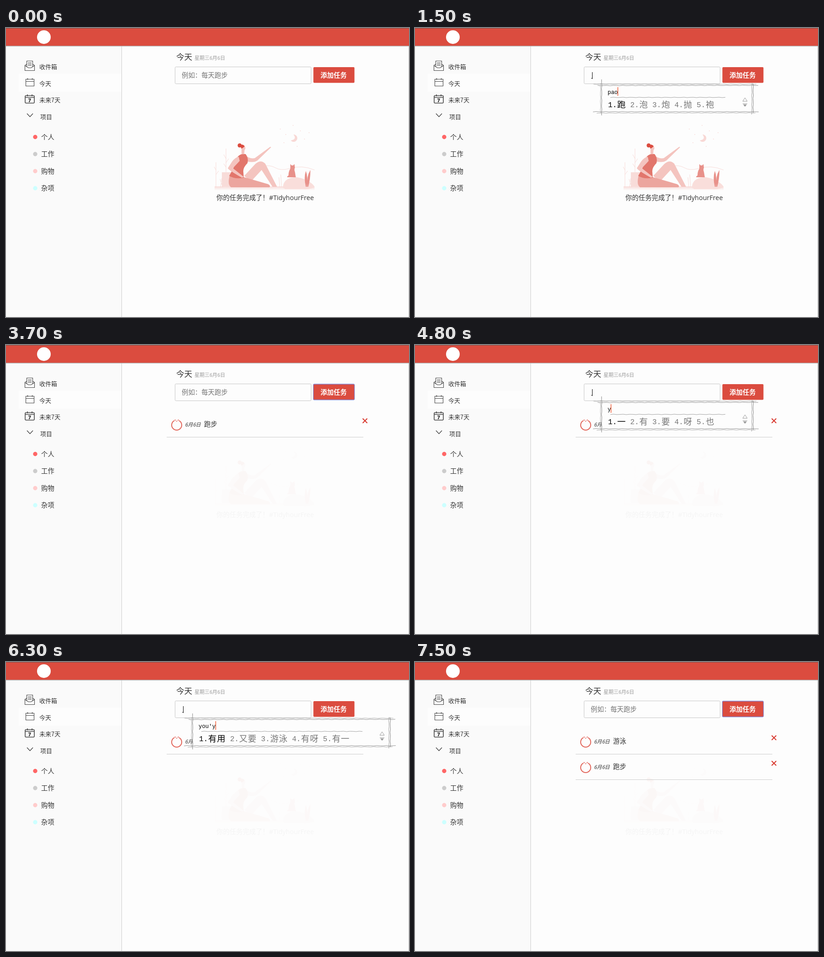
Write an HTML page that moves like this. It is 883 px wide and 635 px high and loops after 8000 ms.

```html
<!DOCTYPE html>
<html lang="zh-CN">
<head>
<meta charset="utf-8">
<style>
  html, body { margin: 0; width: 100%; height: 100%; overflow: hidden; background: #fdfdfd; }
  svg { display: block; width: 883px; height: 635px; }
  text { font: 14.4px "Open Sans", "Noto Sans CJK SC", "Noto Sans CJK", sans-serif; fill: #333; white-space: pre; }
  .cjk { font-family: "Noto Sans CJK SC", "Noto Sans CJK", sans-serif; }
  .centred { font-family: "Noto Sans CJK TC", "Noto Sans CJK", sans-serif; }
  .menu { font-size: 13px; }
  .title { font-size: 17.6px; font-weight: 300; }
  .date { font-size: 11px; fill: #999; }
  .due { font-size: 11.2px; font-style: italic; }
  .hint { fill: #757575; }
  .button { font-weight: 700; fill: #fff; }
  .pinyin { font: 12.4px "Liberation Mono", monospace; fill: #000; }
  .number { font: 16.1px "Liberation Mono", monospace; }
  .word { font-size: 18.5px; font-weight: 300; letter-spacing: .8px; }
  .line { fill: none; stroke: #444; stroke-width: 1.1; }
</style>
</head>
<body>
<svg viewBox="0 0 883 635">
  <defs>
    <linearGradient id="shade" x2="0" y2="1">
      <stop stop-color="#8f8585"/><stop offset="1" stop-color="#fdfdfd" stop-opacity="0"/>
    </linearGradient>
    <linearGradient id="ground" x2="0" y2="1">
      <stop stop-color="#f6cfcb"/><stop offset="1" stop-color="#fdfdfd"/>
    </linearGradient>
  </defs>

  <!-- page -->
  <rect width="253" height="635" fill="#fafafa"/>
  <rect x="28" y="100" width="225" height="40" fill="#fdfdfd"/>
  <path d="M253.5 39V635M882.5 39V635" stroke="#ccc"/>
  <rect y="39" width="883" height="3" fill="url(#shade)"/>
  <rect width="883" height="39" fill="#db4c3f"/>
  <rect width="883" height="1" fill="#7a5550"/>
  <circle cx="83" cy="20" r="15" fill="#fff"/>

  <!-- sidebar -->
  <g class="line">
    <path d="M45.500 79.500L41.500 82V93.500H62.500V82L58.500 79.500M41.500 82.500L49 87.500H55L62.500 82.500M45.500 85V72.500H58.500V85M48 76.500H56M48 79.500H56M48 82.500H56"/>
    <path d="M43.500 112.500H61.500V127.500H43.500ZM43.500 117.500H61.500M47.500 110V114M57.500 110V114"/>
    <path stroke-width="1.6" d="M44 148.500H60Q62 148.500 62 150.500V163Q62 165 60 165H44Q42 165 42 163V150.500Q42 148.500 44 148.500ZM42 152.500H62M47 146V150M57 146V150"/>
    <path stroke-width="1.4" d="M46 188L52.500 195L59 188"/>
  </g>
  <text x="48.500" y="162.500" style="font-size:11px;font-weight:800">7</text>
  <g id="menu"></g>

  <!-- main column -->
  <text class="cjk title" x="373" y="70">今天</text>
  <text class="cjk date" x="413" y="70">星期三6月6日</text>
  <rect x="370.500" y="85.500" width="298" height="37" rx="2" fill="#fdfdfd" stroke="#c6c6c6"/>
  <rect x="673.500" y="86" width="90" height="34.500" rx="2" fill="#db4c3f"/>
  <text class="cjk button" x="689" y="109">添加任务</text>

  <g id="empty">
    <g fill="none" stroke="#f8dcd9">
      <path d="M460 350V295M460 312L456 305M460 322L466 314M470 350L473 330M475 350L469 332M482 318V265M482 287L477 278M482 296L488 287M482 306L477 298"/>
      <path d="M562 304Q578 300 590 307T620 309Q648 300 676 312M600 350L598 328M604 350L602 322"/>
    </g>
    <rect x="473" y="317" width="25" height="31" fill="#f8dcd9"/>
    <rect x="457" y="348" width="219" height="9" fill="url(#ground)" opacity=".7"/>
    <path d="M607 351C607 334 620 328 637 328C655 330 674 342 676 349Q670 355 650 354H612Z" fill="#f9dedb"/>
    <path d="M623 299L626 302H629L632 299L633 307Q631 311 633 316L635 328H617Q614 327 619 324Q619 315 623 309Z" fill="#e8918a"/>
    <path d="M657 349Q652 329 657 314Q662 327 659 349ZM660 349Q658 326 667 312Q667 333 662 349Z" fill="#e8918a"/>
    <path d="M630 234A8 8 0 1 1 624 247Q638 245 630 234Z" fill="#f8d8d5"/>
    <g id="stars" fill="#f8d8d5"></g>
    <path d="M522 325L546 299Q558 288 568 298L594 349H584L560 312L537 337Z" fill="#f4c4bf"/>
    <path d="M491 321Q484 344 493 350H577Q581 347 574 343L519 327Z" fill="#eca59e"/>
    <path d="M525 280Q534 288 545 286L579 261L581 262L551 291Q543 297 527 293Z" fill="#f4c4bf"/>
    <path d="M507 284Q513 275 525 277Q532 286 529 297Q519 307 520 316L521 329Q503 333 489 325Q501 305 507 284Z" fill="#e2766c"/>
    <path d="M510 283Q502 284 495 294L486 308Q487 312 517 329L521 327L497 308L512 292Z" fill="#f4c4bf"/>
    <path d="M516 264H523L522 276Q519 279 516 276Z" fill="#f4c4bf"/>
    <ellipse cx="520" cy="264" rx="4.500" ry="5" fill="#f4c4bf"/>
    <circle cx="512" cy="258" r="4.500" fill="#db4c3f"/>
    <path d="M513 259Q518 253 523 260Q520 263 516 265Z" fill="#db4c3f"/>
    <text x="461" y="378">你的任务完成了<tspan class="centred">！</tspan>#TidyhourFree</text>
  </g>
  <g id="state"></g>
</svg>

<script>
const $ = id => document.getElementById(id);
const LOOP = 8000;
const text = (x, y, cls, s, extra = '') => `<text x="${x}" y="${y}" class="${cls}" ${extra}>${s}</text>`;
const path = (d, stroke, width = 1) => `<path d="${d}" fill="none" stroke="${stroke}" stroke-width="${width}"/>`;

$('menu').innerHTML =
  [['收件箱', 73, 90], ['今天', 73, 126.5], ['未来7天', 73, 162.5], ['项目', 75, 199.5]]
    .map(([s, x, y]) => text(x, y, 'cjk menu', s)).join('') +
  [['个人', '#f66'], ['工作', '#ccc'], ['购物', '#fcc'], ['杂项', '#cff']]
    .map(([s, color], i) => `<circle cx="64" cy="${239.5 + i * 37.5}" r="4.700" fill="${color}"/>` +
      text(77, 244.5 + i * 37.5, 'cjk', s)).join('');

$('stars').innerHTML = [[601, 222], [629, 214], [645, 226], [664, 230], [613, 234], [654, 244], [609, 252], [638, 260]]
  .map(([x, y]) => `<circle cx="${x}" cy="${y}" r=".9"/>`).join('');

// Input method windows: typed letters, candidates, right edge
const NARROW = 741, WIDE = 842;
const windows = {
  p: ['平 跑 怕 排 拍', NARROW],
  pa: ['怕 爬 啪 帕 趴', NARROW],
  pao: ['跑 泡 炮 抛 袍', NARROW],
  "pao'b": ['跑步 抛币 泡吧 炮兵 跑吧', WIDE],
  y: ['一 有 要 呀 也', NARROW],
  yo: ['有一个 有用 哟 有人 有没有', 870],
  you: ['有 又 由 友 游', NARROW],
  "you'y": ['有用 又要 游泳 有呀 有一', WIDE],
};

// Slightly wavering pencil stroke
function pencil(x1, y1, x2, y2, color = '#8a8a8a') {
  const length = Math.hypot(x2 - x1, y2 - y1), n = Math.ceil(length / 7);
  const ux = (x2 - x1) / length, uy = (y2 - y1) / length;
  let d = '';
  for (let i = 0; i <= n; i++) {
    const s = length * i / n, w = Math.sin(i * 2.3 + x1 + y1) * .5;
    d += `${i ? 'L' : 'M'}${x1 + ux * s - uy * w} ${y1 + uy * s + ux * w}`;
  }
  return path(d, color, .9);
}

function imeWindow(letters) {
  const [words, right] = windows[letters];
  const HALF = 9.7, arrow = right - 18, caret = Math.floor(422.5 + letters.length * 7.44) + .5;
  let out = `<rect x="409" y="124" width="${right - 411}" height="62" fill="#fdfdfd"/>` +
    pencil(391, 123.5, right + 7, 123.5, '#aaa') + pencil(400, 126.5, right + 11, 126) +
    pencil(390, 184, right + 12, 184) + pencil(398, 187, right + 5, 186.5, '#aaa') +
    pencil(406.5, 121, 406.5, 187, '#aaa') + pencil(409, 113, 409, 192, '#777') +
    pencil(right - 3, 121, right - 3, 190, '#999') + pencil(right, 122, right, 187, '#777') +
    pencil(428, 152.5, right - 61, 152.5, '#999') +
    text(422, 145, 'pinyin', letters) + path(`M${caret} 130V149`, '#f04a20', 1.3) +
    path(`M${arrow - 5} 161L${arrow} 153.500L${arrow + 5} 161Z`, '#999') +
    path(`M${arrow - 5} 166.500H${arrow + 5}`, '#999') +
    `<path d="M${arrow - 4} 168H${arrow + 4}L${arrow} 173Z" fill="#999"/>`;
  let x = 423;
  words.split(' ').forEach((word, i) => {
    const fill = `fill="${i ? '#777' : '#000'}" style="fill:${i ? '#777' : '#000'}"`;
    out += text(x, 174, 'number', `${i + 1}.`, fill) + text(x + 2 * HALF + .5, 174.7, 'cjk word', word, fill);
    x += HALF * (3 + 2 * word.length);
  });
  return out;
}

const task = (name, i) => `<g transform="translate(0 ${i * 56})">` +
  path('M369 166.200A11 11 0 1 0 379 166.200', '#e2665b', 2) +
  path('M369.800 164L371.600 165.800M372.800 167.500H375.200M376.400 165.800L378.200 164', '#e2665b', 1.7) +
  text(392, 179, 'cjk due', '6月6日') + text(434, 179, 'cjk', name) +
  path('M781.500 161.500L791.500 171.500M791.500 161.500L781.500 171.500', '#d8392f', 2) +
  path('M352 202.500H783', '#ccc') + '</g>';

// Each step: start time, tasks, and what the form shows
const none = [], one = ['跑步'], two = ['游泳', '跑步'];
const START = 385.5, COMPOSE = 388.5, END = 414.5;
const steps = [
  [0, none, {}],
  [500, none, { caret: START }],
  [1000, none, {}],
  [1200, none, { ime: 'p', caret: COMPOSE }],
  [1400, none, { ime: 'pa', caret: COMPOSE }],
  [1500, none, { ime: 'pao', caret: COMPOSE }],
  [1800, none, { ime: "pao'b", caret: COMPOSE }],
  [2200, none, { value: '跑步', caret: END }],
  [2700, none, { value: '跑步' }],
  [3200, none, { value: '跑步', caret: END }],
  [3700, one, { focus: true }],
  [4100, one, { caret: START }],
  [4600, one, {}],
  [4800, one, { ime: 'y', caret: COMPOSE }],
  [4900, one, { ime: 'yo', caret: COMPOSE }],
  [5100, one, { ime: 'you', caret: COMPOSE }],
  [5300, one, { ime: "you'y", caret: COMPOSE }],
  [5800, one, { ime: "you'y" }],
  [6300, one, { ime: "you'y", caret: COMPOSE }],
  [6400, one, { value: '游泳', caret: END }],
  [6900, one, { value: '游泳' }],
  [7400, one, { value: '游泳', caret: END }],
  [7500, two, { focus: true }],
];

const HINT = '例如<tspan class="centred">：</tspan>每天跑步';

function draw([, tasks, { value, caret, ime, focus }]) {
  $('empty').setAttribute('opacity', tasks.length ? .04 : 1);
  let out = tasks.map(task).join('');
  out += value ? text(385, 109, 'cjk', value, 'style="fill:#000"')
    : ime ? path('M386 110.500H388', '#333') : text(385, 109, 'cjk hint', HINT);
  if (caret) out += path(`M${caret} 97V112`, '#000');
  if (focus) out += '<rect x="673.500" y="86" width="90" height="34.500" rx="2" fill="none" stroke="#8585cf" stroke-width="1.300"/>';
  if (ime) out += imeWindow(ime);
  $('state').innerHTML = out;
}

let shown;
function frame() {
  const now = performance.now() % LOOP;
  const step = steps.findLast(([start]) => start <= now);
  if (step !== shown) draw(shown = step);
  requestAnimationFrame(frame);
}
frame();
</script>
</body>
</html>
```
